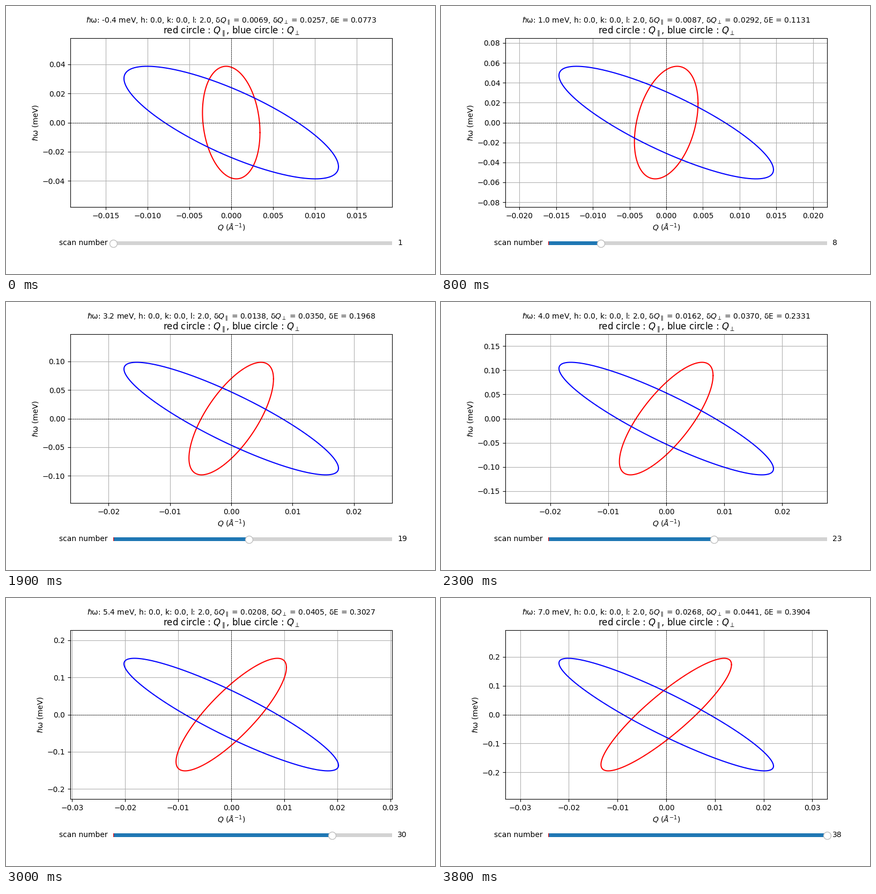
Animation of 800 by 500 pixels, one loop 3.9 s. Source, as a matplotlib script:

```python
import numpy as np
import matplotlib.pyplot as plt
from matplotlib.animation import FuncAnimation
from matplotlib.widgets import Slider

SCANS = 38
FRAMES = 39
INTERVAL = 100
ANGLE = np.linspace(0, 2 * np.pi, 400)


def resolution(e):
    """Widths in Q and energy, and the Q-E covariances, at energy transfer e."""
    par = 1e-2 * np.sqrt(0.527 + 0.157 * e + 0.061 * e**2 + 0.0075 * e**3)
    perp = 1e-4 * (266.8 + 25.4 * e + 0.36 * e**2 - 0.063 * e**3)
    height = np.sqrt(1e-3 * (7.349 + 3.942 * e + 1.358 * e**2 + 0.14845 * e**3))
    cov_par = 1e-3 * e * (0.26 + 0.065 * e + 0.0125 * e**2)
    cov_perp = -1e-3 * (1.833 + 0.762 * e + 0.175 * e**2)
    return par, perp, height, cov_par, cov_perp


def ellipse(width, height, cov):
    corr = cov / (width * height)
    x = width / 2 * np.cos(ANGLE)
    y = height / 2 * (corr * np.cos(ANGLE) + np.sqrt(1 - corr**2) * np.sin(ANGLE))
    return x, y


fig, ax = plt.subplots(figsize=(8, 5), dpi=100)
fig.subplots_adjust(left=0.15, right=0.9, bottom=0.25, top=0.88)

red_line, = ax.plot([], [], color="red")
blue_line, = ax.plot([], [], color="blue")
for zero_line in (ax.axhline, ax.axvline):
    zero_line(0, color="black", linestyle="--", linewidth=0.5)
ax.grid(True)
ax.set_xlabel(r"$Q$ ($\AA^{-1}$)")
ax.set_ylabel("ℏω (meV)")
ax.set_title(r"red circle : $Q_{\parallel}$, blue circle : $Q_{\perp}$")
summary = ax.text(0.5, 1.1, "", transform=ax.transAxes, ha="center", va="center")

slider_ax = fig.add_axes([0.25, 0.1, 0.65, 0.03])
slider = Slider(slider_ax, "scan number", 1, SCANS, valinit=1, valstep=1, valfmt="%d")
slider.drawon = False


def update(frame):
    scan = max(1, frame)
    energy = -0.4 + 0.2 * (scan - 1)
    par, perp, height, cov_par, cov_perp = resolution(energy)

    red_line.set_data(*ellipse(par, height, cov_par))
    blue_line.set_data(*ellipse(perp, height, cov_perp))
    ax.set_xlim(-0.75 * perp, 0.75 * perp)
    ax.set_ylim(-0.75 * height, 0.75 * height)
    summary.set_text(
        rf"ℏω: {energy:.1f} meV, h: 0.0, k: 0.0, l: 2.0, "
        rf"δ$Q_{{\parallel}}$ = {par:.4f}, δ$Q_{{\perp}}$ = {perp:.4f}, "
        rf"δE = {height:.4f}"
    )
    slider.set_val(scan)
    return red_line, blue_line, summary


anim = FuncAnimation(fig, update, frames=FRAMES, interval=INTERVAL, repeat=True,
                     repeat_delay=0, blit=False)
plt.show()
```
